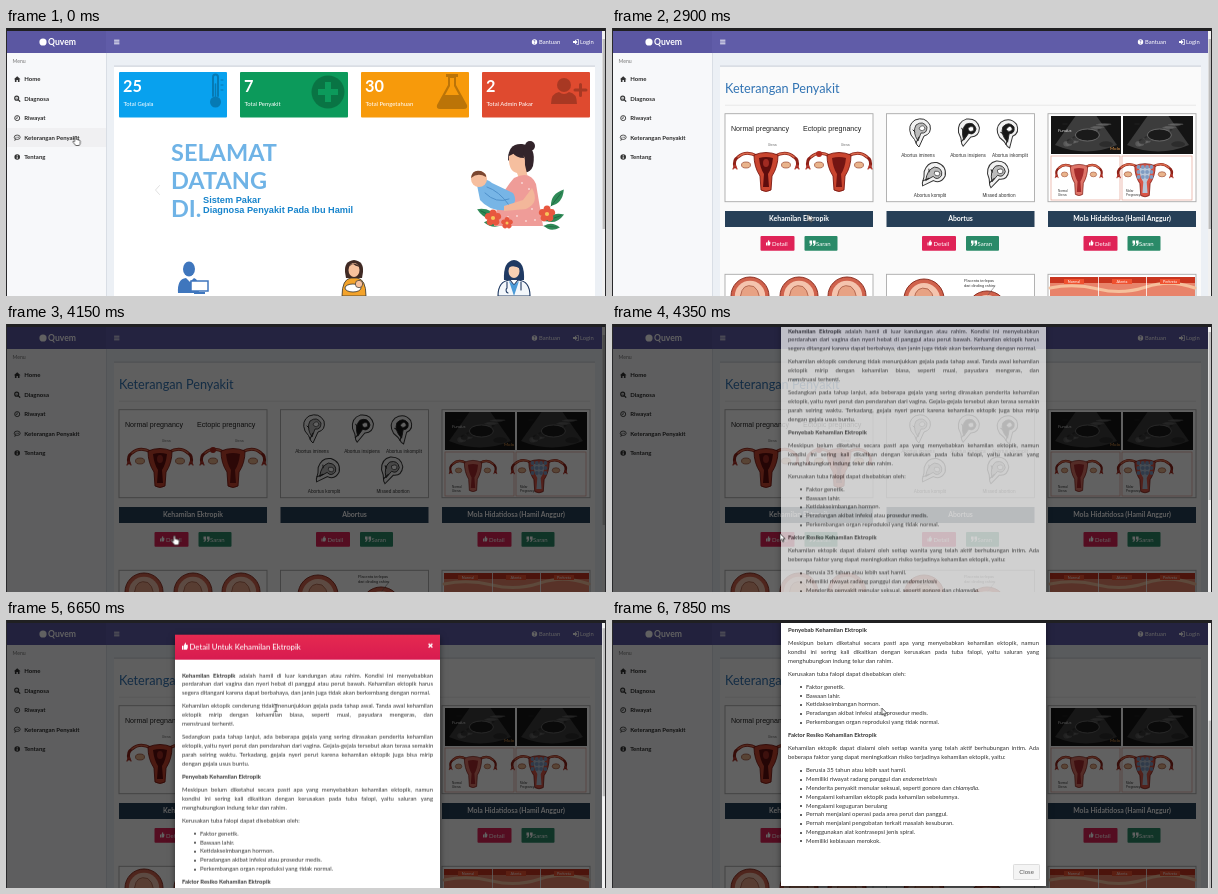
These frames come from a looping animation (600 px wide and 268 px high, 8000 ms). An HTML page:

```html
<!DOCTYPE html>
<html lang="id">
<head>
<meta charset="utf-8">
<title>Sistem Pakar</title>
<style>
html,body{margin:0;width:100%;height:100%;overflow:hidden;background:#222}
#stage{position:absolute;left:0;top:0;width:600px;height:268px;overflow:hidden;font-family:Lato,"Open Sans",sans-serif}
#stage>*{position:absolute}
svg{left:0;top:0;display:block}
svg text{font-family:Lato,"Open Sans",sans-serif}
svg .ar{font-family:"Liberation Sans",Arial,sans-serif}
#dim{left:0;top:0;width:600px;height:268px;background:#000;opacity:0}
#scroll{left:169px;top:15px;width:265px}
#modal{background:#fff;height:398px;opacity:0;box-shadow:0 2px 6px rgba(0,0,0,.5);position:relative;color:#333;font-size:5.95px}
#head{height:25px;background:linear-gradient(#e62a50,#d81b50);color:#fff}
#title{position:absolute;left:14.5px;top:6.5px;font-size:7.75px;font-weight:500;line-height:10px;white-space:nowrap}
#body{position:absolute;left:7px;top:36.6px;width:251px;line-height:8.8px}
#body div{white-space:nowrap;height:8.8px}
#body section{margin-bottom:4.4px}
.j{text-align:justify;text-align-last:justify}
.li{padding-left:18px;position:relative}
.li:before{content:"";position:absolute;left:11.6px;top:3.6px;width:2px;height:2px;border-radius:50%;background:#333}
#close{position:absolute;left:232px;top:376px;width:25px;height:14px;border:.6px solid #ddd;border-radius:1.3px;background:#f4f4f4;text-align:center;line-height:14px;font-size:6px;color:#555}
</style>
</head>
<body>
<div id="stage">
  <svg id="page" width="600" height="268"></svg>
  <div id="dim"></div>
  <div id="scroll"><div id="modal">
    <div id="head"><svg width="265" height="25" style="position:absolute"><g fill="#fff"><path d="M7 11h1.300v4H7zM8.800 11l1.500-3q1.200 0 .6 2h1.800q.6 2.500-.8 5H8.800z"/></g><path d="M253.600 9l3.800 3.800m0-3.800l-3.800 3.800" stroke="#fff" stroke-width="1.400"/></svg><span id="title">Detail Untuk Kehamilan Ektropik</span></div>
    <div id="body"></div>
    <div id="close">Close</div>
  </div></div>
  <svg id="top" width="600" height="268"></svg>
</div>
<script>
const LOOP = 8000;
const $ = id => document.getElementById(id);
const rect = (x, y, w, h, fill, more = '') => `<rect x="${x}" y="${y}" width="${w}" height="${h}" fill="${fill}" ${more}/>`;
const disc = (x, y, r, fill, more = '') => `<circle cx="${x}" cy="${y}" r="${r}" fill="${fill}" ${more}/>`;
const oval = (x, y, a, b, fill, more = '') => `<ellipse cx="${x}" cy="${y}" rx="${a}" ry="${b}" fill="${fill}" ${more}/>`;
const path = (d, fill, more = '') => `<path d="${d}" fill="${fill}" ${more}/>`;
const line = (d, color, w = 1) => path(d, 'none', `stroke="${color}" stroke-width="${w}" stroke-linecap="round" stroke-linejoin="round"`);
const text = (x, y, size, fill, s, more = '') => `<text x="${x}" y="${y}" font-size="${size}" fill="${fill}" ${more}>${s}</text>`;
const at = (x, y, s, more = '') => `<g transform="translate(${x} ${y}) ${more}">${s}</g>`;
const B = 'font-weight="700"', MID = 'text-anchor="middle"', AR = 'class="ar"';

// Sidebar and navbar
const menuIcons = [
  path('M-3.300 0L0-3 3.300 0H2.300V2.700H.7V.8H-.7V2.700H-2.300V0z', '#333'),
  disc(-.5, -.5, 2, 'none', 'stroke="#333" stroke-width="1.100"') + line('M1 1L2.600 2.600', '#333', 1.2) + line('M-1.300-.5H.3', '#333', .6),
  disc(0, 0, 2.5, 'none', 'stroke="#333" stroke-width=".9"') + line('M0-1.300V.3H-1', '#333', .7),
  oval(0, -.3, 3, 2.2, 'none', 'stroke="#333" stroke-width=".8"') + line('M-1.300-.3h0M0-.3h0M1.300-.3h0M-1.800 1.500L-2.300 2.800', '#333', .9),
  disc(0, 0, 2.8, '#333') + line('M0-.2V1.500M0-1.500h0', '#fff', .9)
];
const frame = () => {
  const labels = ['Home', 'Diagnosa', 'Riwayat', 'Keterangan Penyakit', 'Tentang'];
  return rect(0, 0, 600, 268, '#ecf0f5') + rect(0, 25, 100, 243, '#f7f8fa') + rect(100, 25, .7, 243, '#d2d6de') +
    rect(0, 3, 596, 22, '#605ca8') + rect(0, 3, 100, 22, '#5b57a2') +
    disc(37, 14, 3.6, '#fff') + text(42, 17, 8.6, '#fff', 'Quvem', B) +
    line('M108.500 12.200h4.500M108.500 14h4.500M108.500 15.800h4.500', '#fff', .9) +
    disc(528.500, 14, 2.7, '#fff') + text(528.500, 16, 5, '#605ca8', '?', B + MID) +
    text(533, 16.2, 5.8, '#fff', 'Bantuan') + text(574, 16.2, 5.8, '#fff', 'Login') +
    path('M567 13h2v-1.500L571.500 14 569 16.500V15h-2z', '#fff') + line('M571 11.500h1.500v5H571', '#fff', .7) +
    text(6.5, 35.2, 5.2, '#777', 'Menu') + rect(0, 100, 100, 19, '#f0f0f2', 'id="hover"') +
    labels.map((s, i) => at(11.200, 51.2 + i * 19.45, menuIcons[i] + text(7, 2, 6, '#2b2b2b', s, B))).join('') +
    rect(108, 38, 481, 230, '#fff') + rect(108, 37.5, 481, 1.3, '#d2d6de') +
    rect(596, 3, 3, 265, '#f1f1f1') + rect(596.6, 11, 2.4, 190, '#bdbdbd');
};

// Home view
const leaf = (x, y, a, s = 1) => at(x, y, path('M0 0Q6-7 0-16Q-6-7 0 0z', '#2f8a57') + line('M0 0V-13', '#1d6540', .6), `rotate(${a}) scale(${s})`);
const flower = (x, y, r) => [0, 72, 144, 216, 288].map(a => at(x, y, oval(0, -r * .6, r * .5, r * .6, '#e8573f'), `rotate(${a})`)).join('') + disc(x, y, r * .3, '#f7c35a');
const mother = () =>
  leaf(490, 190, -65, 1.3) + leaf(487, 178, -35, 1.2) + leaf(497, 196, -85, 1.2) + leaf(540, 193, 70, 1.2) + leaf(545, 178, 38, 1.3) + leaf(538, 198, 95, 1) +
  disc(524, 118, 5, '#33242b') +
  path('M502 132Q502 115 516 116Q531 118 527 138Q524 146 516 144z', '#33242b') +
  path('M503 128Q502 143 511 145L514 153 522 150 519 137Q520 127 513 123z', '#f6bf9f') +
  path('M502 128Q506 117 517 119L518 130Q510 130 506 124z', '#33242b') +
  path('M508 150Q524 142 530 156L537 198H488Q490 170 508 150z', '#ef9c98') +
  line('M516 155h0M523 161h0M514 178h0M521 172h0M526 181h0M511 188h0M529 192h0M520 193h0M502 189h0', '#fff', 1.6) +
  path('M471 157Q477 147 486 155L507 165Q513 174 502 182Q484 184 474 172z', '#77b5e6') +
  line('M479 165Q490 176 503 171M481 159Q493 163 503 177', '#4f91cb', 1) +
  disc(473, 151, 8, '#f6bf9f') + path('M465 150Q466 141 475 143Q481 146 480 149Q472 144 465 150z', '#7a4630') +
  path('M526 160Q534 175 520 181L498 183V178L517 172z', '#f3b79a') +
  flower(487, 190, 7) + flower(541, 186, 7) + flower(501, 195, 5);

const cardIcons = [
  line('M-2 4V-15a2.500 2.500 0 0 1 5 0V4', '#000', 2) + disc(.5, 10, 5.5, '#000') + line('M.5-8V8', '#000', 1.5) + line('M6-12h2M6-7h2M6-2h2', '#000', 1),
  disc(0, 0, 16.500, '#000') + path('M-3-10h6v7h7v6H3v7H-3V3h-7v-6h7z', '#0c9a5b'),
  path('M-6-18H6v3H4v8L15 13Q16 17 12 17H-12Q-16 17-15 13L-4-7v-8h-2zM-2-14v8L-7 3H7L2-6v-8z', '#000', 'fill-rule="evenodd"'),
  disc(-4, -7, 7, '#000') + path('M-17 12Q-17 1-9 0Q-4 4 1 0Q9 1 9 12z', '#000') + line('M7-2h11M12.500-7.500v11', '#000', 3)
];
const home = () => {
  const cards = [['25', 'Total Gejala', '#08a1ee', 209], ['7', 'Total Penyakit', '#0c9a5b', 322], ['30', 'Total Pengetahuan', '#f79a0b', 446], ['2', 'Total Admin Pakar', '#df4a2f', 562]];
  return cards.map(([n, s, c, ix], i) => {
    const x = 113 + i * 121;
    return rect(x, 44, 108, 45.5, c, 'rx="1"') + `<g opacity=".24">${at(ix, 64, cardIcons[i])}</g>` +
      text(x + 4, 63.6, 16.3, '#fff', n, B) + text(x + 4.5, 78.3, 5.9, '#fff', s);
  }).join('') +
    ['SELAMAT', 'DATANG', 'DI.'].map((s, i) => text(165, 133 + i * 28, 23.5, '#6fb3e6', s, B)).join('') +
    text(197, 175, 9.2, '#1784cc', 'Sistem Pakar', AR + B) + text(197, 185.3, 9.2, '#1784cc', 'Diagnosa Penyakit Pada Ibu Hamil', AR + B) +
    line('M153.500 157.500l-4 4.500 4 4.500', '#ddd', .9) + mother() +
    at(184, 250, oval(-1, -9, 6, 7.500, '#3f76bd') + path('M-12 15Q-13 1-4 0L0 4 4 0Q9 1 9 15z', '#3f76bd') + rect(1, 3, 17, 10, '#fff', 'stroke="#3f76bd" stroke-width="1.500"') + rect(4, 14, 11, 2, '#3f76bd')) +
    at(348, 250, path('M-9-6Q-10-17 0-18Q10-17 9-6L8 0H-8z', '#402a24') + oval(0, -8, 5.5, 7, '#f7c19c') + path('M-6-11Q0-18 6-11Q1-12-1-14z', '#402a24') + path('M-12 18Q-12 1-3 0H3Q12 1 12 18z', '#f3a32b', 'stroke="#333" stroke-width=".8"') + oval(-1, 10, 8, 4, '#fff', 'stroke="#333" stroke-width=".8"') + disc(5, 6, 3.7, '#f7c19c', 'stroke="#333" stroke-width=".7"')) +
    at(508, 250, path('M-10 2Q-11-17 0-18Q11-17 10 2z', '#203a63') + oval(0, -7, 5.5, 7, '#f7d0b4') + path('M-7-8Q-3-15 7-9Q6-18 0-17Q-8-16-7-8z', '#203a63') + path('M-16 18Q-16 3-4 2L0 7 4 2Q16 3 16 18z', '#f3f7fb', 'stroke="#203a63" stroke-width="1.200"') + path('M-5 3L0 18 5 3 0 7z', '#4c9bd8') + line('M-7 4V10a3 3 0 0 0 1 5M7 4V12', '#203a63', 1.1));
};

// Disease list view
const uterus = (fill, core) =>
  line('M-9-11Q-20-17-28-10Q-33-7-31 0M9-11Q20-17 28-10Q33-7 31 0', '#8f2118', 3) + line('M-9-11Q-20-17-28-10M9-11Q20-17 28-10', '#d96a4c', 1.6) +
  line('M-33 2l2-4 2 4M33 2l-2-4-2 4', '#b5352a', 1.3) + oval(-20, -2, 4.5, 3, '#e9b48c', 'stroke="#99452f" stroke-width=".7"') + oval(20, -2, 4.5, 3, '#e9b48c', 'stroke="#99452f" stroke-width=".7"') +
  path('M-12-12Q0-17 12-12Q12 0 6 9L5 23Q0 26-5 23L-6 9Q-12 0-12-12z', fill, 'stroke="#7a1710" stroke-width=".9"') +
  path('M-7-9Q0-11 7-9Q6 1 2 7L3 20H-3L-2 7Q-6 1-7-9z', core);
const sac = k => path('M-3 13Q-5 7-9 3Q-13-7-5-12Q5-16 10-7Q12 2 4 4L-1 15z', '#f2f2f2', 'stroke="#333" stroke-width="1"') +
  path('M-2 9Q-8 0-4-7Q3-12 7-5Q7 2 1 1z', k ? '#181818' : '#bbb', 'stroke="#222" stroke-width=".8"') +
  path('M-1-4Q4-9 5-3Q2 0 0-2z', '#fff', 'stroke="#222" stroke-width=".6"') + line('M-4 11L-1 5M-7-2l2 2', '#222', 1);

const scan = (x, w) => {
  let s = rect(x, 88, w, 38, '#141414') + path(`M${x + w * .35} 88H${x + w * .65}L${x + w - 4} 117Q${x + w / 2} 130 ${x + 4} 117z`, '#3c3c3c');
  for (let i = 0; i < 22; i++) {
    const u = (i * .618) % 1, v = (i * .377) % 1;
    s += oval(x + 14 + u * (w - 28), 96 + v * 22, 3 + u * 4, 1 + v * 2, i % 3 ? '#6a6a6a' : '#222', 'opacity=".6"');
  }
  return s + oval(x + w * .52, 107, 12, 6, '#1a1a1a', 'stroke="#777" stroke-width=".8"');
};
const art1 = () => text(119, 102.7, 7.1, '#222', 'Normal pregnancy', AR) + text(191, 102.7, 7.1, '#222', 'Ectopic pregnancy', AR) +
  at(154, 139, uterus('#c9452f', '#5e0d0d') + oval(0, -4, 3, 4, '#a02a22')) + at(227, 139, uterus('#c9452f', '#741513') + disc(-20, -13, 3, '#b22a20')) +
  text(156, 118, 3, '#666', 'Uterus', AR) + text(229, 118, 3, '#666', 'Uterus', AR);
const art2 = () => [[308, 104, 0, 0], [356, 104, 1, 15], [396, 105, 1, -10], [321, 147, 0, 40], [385, 146, 0, 20]].map(([x, y, k, a]) => at(x, y, sac(k), `rotate(${a})`)).join('') +
  [[306, 129, 'Abortus iminens'], [356, 129, 'Abortus insipiens'], [398, 129, 'Abortus inkomplit'], [318, 169, 'Abortus komplit'], [387, 169, 'Missed abortion']].map(([x, y, s]) => text(x, y, 4.7, '#333', s, AR + MID)).join('');
const art3 = () => scan(439, 70) + scan(511, 70) + text(446, 104, 4.5, '#ddd', 'Fundus', 'font-style="italic"') + text(498, 122, 4.5, '#e89a4a', 'Mola') +
  rect(439, 128, 69, 44, '#fff', 'stroke="#e5a394" stroke-width=".7"') + rect(510, 128, 70, 44, '#fff', 'stroke="#e5a394" stroke-width=".7"') +
  at(467, 148, uterus('#de7468', '#a52b2c'), 'scale(.72 .8)') + at(533, 148, uterus('#d95648', '#b8c6d8'), 'scale(.85)') +
  [0, 1, 2, 3, 4, 5, 6, 7, 8, 9, 10, 11].map(i => disc(526.5 + i % 4 * 4.3, 139 + (i / 4 | 0) * 5, 1.9, '#7f9cc2')).join('') +
  text(446, 164, 3, '#333', 'Normal', AR) + text(446, 168, 3, '#333', 'Uterus', AR) + text(514, 164, 3, '#333', 'Molar', AR) + text(514, 168, 3, '#333', 'Pregnancy', AR);
const womb = (x, y, r) => disc(x, y, r, '#d0624c', 'stroke="#8c3023" stroke-width="1"') + disc(x, y, r * .8, '#f4c4ae') +
  path(`M${x - r * .5} ${y}Q${x - r * .4} ${y - r * .7} ${x + r * .2} ${y - r * .5}Q${x + r * .7} ${y - r * .1} ${x + r * .3} ${y + r * .6}z`, '#e7a284', 'stroke="#a65a43" stroke-width=".8"');
const lower = () => [138, 187, 235].map(x => womb(x, 268, 19)).join('') +
  womb(312, 271, 20) + womb(375, 283, 20) + text(352, 254, 3.9, '#333', 'Placenta terlepas', AR) + text(352, 258.500, 3.9, '#333', 'dari dinding rahim', AR) + line('M383 258L376 267', '#555', .5) +
  rect(438, 249, 145, 19, '#e8836a') + rect(438, 249, 145, 6, '#c9351f') + line('M438 260Q462 255 486 261T534 259T583 260', '#f5c09c', 3) + rect(486, 249, .8, 19, '#fff') + rect(534, 249, .8, 19, '#fff') +
  ['Normal', 'Akreta', 'Perkreta'].map((s, i) => rect(452 + i * 48, 251, 20, 5, '#f0512f') + text(462 + i * 48, 255, 3.8, '#fff', s, MID)).join('');

const button = (x, w, fill, icon, s) => rect(x, 208, w, 14.800, fill, 'rx="1"') + icon + text(x + 11.500, 217.5, 6, '#fff', s);
const list = () => rect(108, 39, 481, 229, '#fafafa') + text(113, 65, 12.7, '#3173b3', 'Keterangan Penyakit') + rect(113, 76.8, 471, .7, '#e2e2e2') +
  ['Kehamilan Ektropik', 'Abortus', 'Mola Hidatidosa (Hamil Anggur)'].map((s, i) => {
    const x = 113 + i * 161.5, box = 'stroke="#aaa" stroke-width=".9"';
    return rect(x, 85.7, 148, 88, '#fff', box) + rect(x, 246.3, 148, 40, '#fff', box) + rect(x, 183, 148, 16, '#263f57') +
      text(x + 74, 193.4, 6.9, '#fff', s, B + MID) +
      button(x + 35.500, 34, '#df2357', path(`M${x + 41} 214.500h1v3H${x + 41}zM${x + 42.400} 214.500l1.200-2.500q1 0 .5 1.700h1.200q.5 2-.6 3.800h-2.300z`, '#fff'), 'Detail') +
      button(x + 79.500, 33, '#2a8a68', [84.500, 88].map(d => path(`M${x + d} 212.500h2.600v3q0 2-2.400 2.500v-1q1-.5 1-1.500h-1.200z`, '#fff')).join(''), 'Saran');
  }).join('') + art1() + art2() + art3() + lower();

$('page').innerHTML = frame() + `<g id="home">${home()}</g><g id="list">${list()}</g>`;

// Modal text: * marks a list item, # a heading, < the ragged last line
const copy = `<b>Kehamilan Ektropik</b> adalah hamil di luar kandungan atau rahim. Kondisi ini menyebabkan
perdarahan dari vagina dan nyeri hebat di panggul atau perut bawah. Kehamilan ektopik harus
<segera ditangani karena dapat berbahaya, dan janin juga tidak akan berkembang dengan normal.

Kehamilan ektopik cenderung tidak menunjukkan gejala pada tahap awal. Tanda awal kehamilan
ektopik mirip dengan kehamilan biasa, seperti mual, payudara mengeras, dan
<menstruasi terhenti.

Sedangkan pada tahap lanjut, ada beberapa gejala yang sering dirasakan penderita kehamilan
ektopik, yaitu nyeri perut dan pendarahan dari vagina. Gejala-gejala tersebut akan terasa semakin
parah seiring waktu. Terkadang, gejala nyeri perut karena kehamilan ektopik juga bisa mirip
<dengan gejala usus buntu.

#Penyebab Kehamilan Ektropik

Meskipun belum diketahui secara pasti apa yang menyebabkan kehamilan ektopik, namun
kondisi ini sering kali dikaitkan dengan kerusakan pada tuba falopi, yaitu saluran yang
<menghubungkan indung telur dan rahim.

<Kerusakan tuba falopi dapat disebabkan oleh:

*Faktor genetik.
*Bawaan lahir.
*Ketidakseimbangan hormon.
*Peradangan akibat infeksi atau prosedur medis.
*Perkembangan organ reproduksi yang tidak normal.

#Faktor Resiko Kehamilan Ektropik

Kehamilan ektopik dapat dialami oleh setiap wanita yang telah aktif berhubungan intim. Ada
<beberapa faktor yang dapat meningkatkan risiko terjadinya kehamilan ektopik, yaitu:

*Berusia 35 tahun atau lebih saat hamil.
*Memiliki riwayat radang panggul dan <i>endometriosis</i>
*Menderita penyakit menular seksual, seperti gonore dan <i>chlamydia.</i>
*Mengalami kehamilan ektopik pada kehamilan sebelumnya.
*Mengalami keguguran berulang
*Pernah menjalani operasi pada area perut dan panggul.
*Pernah menjalani pengobatan terkait masalah kesuburan.
*Menggunakan alat kontrasepsi jenis spiral.
*Memiliki kebiasaan merokok.`;
const row = s => s[0] === '*' ? `<div class="li">${s.slice(1)}</div>`
  : s[0] === '#' ? `<div><b>${s.slice(1)}</b></div>`
  : s[0] === '<' && s.slice(0, 3) !== '<b>' ? `<div>${s.slice(1)}</div>`
  : `<div class="j">${s}</div>`;
$('body').innerHTML = copy.split('\n\n').map(p => `<section>${p.split('\n').map(row).join('')}</section>`).join('');

const outline = 'stroke="#222" stroke-width=".7"';
$('top').innerHTML = `<g id="bar">${rect(596, 3, 3, 265, '#f1f1f1')}<g id="thumb">${rect(596.6, 8, 2.4, 168, '#bdbdbd')}</g></g>` +
  rect(0, 0, 600, 3, '#202022') + rect(0, 0, 1, 268, '#29292b') + rect(599, 0, 1, 268, '#29292b') +
  `<g id="cursor"><g id="arrow">${path('M0 0V7.200L1.700 5.700 2.800 8.200 4 7.700 2.900 5.300H5.200z', '#fff', outline)}</g>` +
  `<g id="beam">${line('M-1.300-3.800Q0-3.800 0-3V3Q0 3.800-1.300 3.800M1.300-3.800Q0-3.800 0-3M0 3Q0 3.800 1.300 3.800', '#333', .8)}</g>` +
  `<g id="hand">${path('M-.9 5V.8Q0-.6.9.8V3.500Q2 3 2.300 4Q3.300 3.500 3.700 4.500Q4.800 4.300 4.800 5.500Q5 8 3.700 9.500H.2Q-1 8-2.500 6Q-2.500 4.500-.9 5.500z', '#fff', outline)}</g></g>`;

// Steps are [time, value, easing to the next step]
const run = (id, prop, steps) => {
  const all = [[0, steps[0][1]], ...steps, [LOOP, steps[steps.length - 1][1]]];
  $(id).animate(all.map(([t, v, easing = 'linear']) => ({ offset: t / LOOP, [prop]: v, easing })), { duration: LOOP, iterations: Infinity });
};
const flip = (id, start, times) => {
  let on = start;
  run(id, 'opacity', times.flatMap(t => { const s = [[t, +on], [t, +!on]]; on = !on; return s; }));
};
const move = (id, steps) => run(id, 'transform', steps.map(([t, x, y, e]) => [t, `translate(${x}px,${y}px)`, e]));

flip('home', true, [750]);
flip('list', false, [750]);
flip('hover', true, [1650]);
flip('hand', true, [1700, 3200, 4250]);
flip('arrow', false, [1700, 3200, 4250, 5400, 6950]);
flip('beam', false, [5400, 6950]);
flip('bar', false, [4250]);
run('dim', 'opacity', [[3970, 0], [4140, .62]]);
run('modal', 'opacity', [[4245, 0], [4395, 1]]);
move('modal', [[4245, 0, -100, 'ease-out'], [4545, 0, 0]]);
const wheel = [[6650, 0, 'ease-out'], [6860, 44, 'ease-out'], [7060, 88, 'ease-out'], [7250, 121], [7480, 121, 'ease-out'], [7680, 147]];
move('scroll', wheel.map(([t, y, e]) => [t, 0, -y, e]));
move('thumb', wheel.map(([t, y, e]) => [t, 0, y * .63, e]));
move('cursor', [
  [50, 69.5, 108], [150, 72.5, 110.5], [1600, 72.5, 110.5, 'ease-in-out'], [2100, 150, 160], [2300, 150, 160, 'ease-in-out'],
  [3100, 203, 190], [3300, 198, 212], [3550, 169, 214.5], [4000, 169, 214.5], [4250, 168, 209.5], [4600, 168, 209.5, 'ease-in-out'],
  [5400, 216, 70], [5750, 269.7, 88]
]);
</script>
</body>
</html>
```
